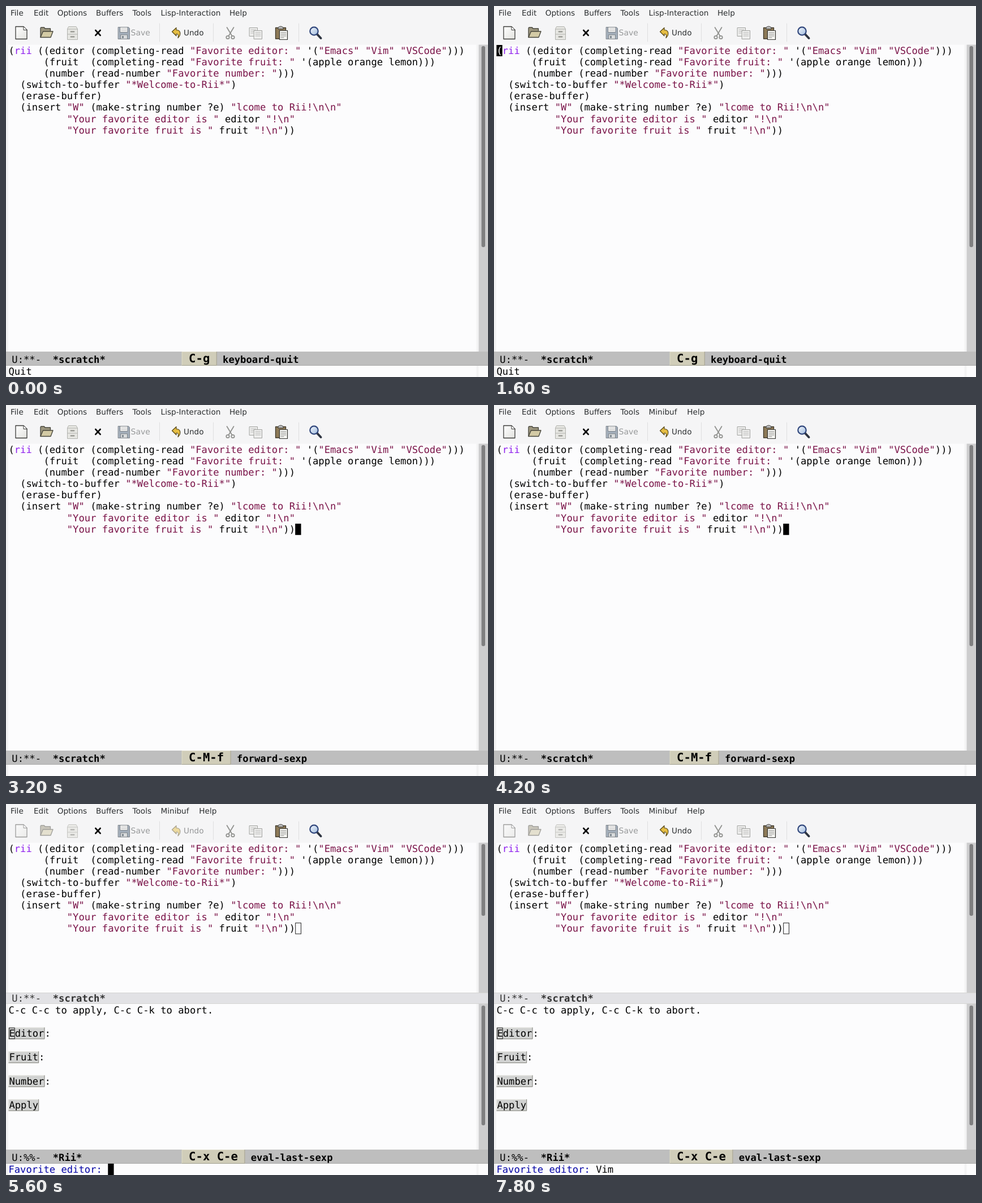
Recreate the animation shown at these times as an HTML page. Size 852x657 px, loop 8 s.

```html
<!DOCTYPE html>
<html lang="en">
<head>
<meta charset="utf-8">
<title>Form built from a Lisp expression</title>
<style>
  html, body { margin: 0; width: 100%; height: 100%; overflow: hidden; background: #fcfcfd; }
  svg { display: block; }
  text { white-space: pre; text-rendering: geometricPrecision; }
  .mono { font: 17.18px "DejaVu Sans Mono", monospace; fill: #000; }
  .bold { font-weight: bold; }
  .key { font-size: 20.6px; font-weight: bold; }
  .dim { fill: #333; }
  .glyph { fill: #fff; }
  .ui { font: 13.6px "DejaVu Sans", sans-serif; fill: #2b2e30; }
  .save { font-size: 14px; fill: #989a9b; }
  .str { fill: #7a1348; }
  .kw { fill: #8f1fee; }
  .prompt { fill: #0505a5; }
</style>
</head>
<body>
<svg id="stage" width="852" height="657" viewBox="0 0 852 657">
  <defs>
    <linearGradient id="page" x1="0" y1="0" x2="1" y2="1">
      <stop offset="0" stop-color="#fff"/><stop offset="1" stop-color="#e2e2de"/>
    </linearGradient>
    <linearGradient id="lens" x1="0" y1="0" x2="1" y2="1">
      <stop offset="0" stop-color="#f4f8fd"/><stop offset="1" stop-color="#9db9dc"/>
    </linearGradient>
  </defs>
  <rect width="852" height="657" fill="#fcfcfd"/>
  <rect width="852" height="68.5" fill="#f5f5f6"/>
  <path d="M0 68.5H4V657H0ZM831.5 68.5H835.5V657H831.5Z" fill="#f3f3f4"/>
  <g id="menu"></g>

  <g stroke-linejoin="round" stroke-linecap="round">
    <path d="M271.5 31V63M366.5 31V63M517.5 31V63" stroke="#dededf"/>
    <g id="fileIcons">
      <path d="M17 36.5H31L37 42.5V58.5H17Z" fill="url(#page)" stroke="#3c3c3a" stroke-width="1.3"/>
      <path d="M31 36.5V42.5H37Z" fill="#fff" stroke="#3c3c3a"/>
      <path d="M61 55.5V39.5Q61 38 62.5 38H67.5L69 40H78.5V44" fill="#9d977f" stroke="#45443a" stroke-width="1.3"/>
      <path d="M61 55.5L65.5 45H83L79 55.5Z" fill="#d3caa5" stroke="#45443a" stroke-width="1.3"/>
    </g>
    <g id="cabinet" stroke="#b1b2ad">
      <path d="M111 36.5H124L126.5 41V59.5H108.5V41Z" fill="#e6e6e2"/>
      <path d="M108.5 41H126.5M108.5 50H126.5"/>
      <path d="M114.5 45.500H120.5M114.5 54.5H120.5" stroke="#8b8c86" stroke-width="1.8"/>
    </g>
    <path d="M158.3 43L166.7 52M166.7 43L158.3 52" stroke="#0b0b0b" stroke-width="2.6"/>
    <g stroke="#7f858b">
      <path d="M198.5 37.5H216.5L218.5 39.5V58.5H198.5Z" fill="#a2adb9"/>
      <path d="M202 37.5H215V46.5H202Z" fill="#f0f0ef"/>
      <path d="M204 40.5H213M204 43.5H213" stroke="#c5c5c5"/>
      <path d="M203 51H214.5V58.5H203Z" fill="#d9dbdc"/>
      <path d="M205 53H208V57H205Z" fill="#7e8890" stroke="none"/>
    </g>
    <g id="undo">
      <path d="M293.5 45.5L301 38.5V42.5C308.5 42.5 310.5 50 304 56.5C305.5 51.5 304.5 49.5 301 49.5V53Z" fill="#e5bd43" stroke="#554719" stroke-width="1.2"/>
      <text class="ui" x="314" y="52">Undo</text>
    </g>
    <g fill="none" stroke="#91928f" stroke-width="1.8">
      <path d="M390.5 38L399.5 53M402.5 38L393.5 53"/>
      <circle cx="392" cy="55.5" r="2.7"/><circle cx="401" cy="55.5" r="2.7"/>
    </g>
    <g fill="#eeeeed" stroke="#a0a19e">
      <path d="M430.5 38.5H444.5V53.5H430.5Z"/>
      <path d="M433 42H442M433 45H442M433 48H437" stroke="#bcbcba"/>
      <path d="M438.5 43.5H452.5V58.5H438.5Z"/>
      <path d="M441 47H450M441 50H450M441 53H450" stroke="#b8b8b6"/>
    </g>
    <g>
      <path d="M476.5 38.5H494.5V58H476.5Z" fill="#8d7a58" stroke="#3f3829" stroke-width="1.3"/>
      <path d="M481 40.5V38Q485.5 34 490 38V40.5Z" fill="#bbb" stroke="#3c3c3a"/>
      <path d="M483.5 43.5H497.5V59.5H483.5Z" fill="#f5f5f1" stroke="#343431" stroke-width="1.2"/>
      <path d="M486 47H495M486 50H495M486 53H495M486 56H491" stroke="#888"/>
    </g>
    <path d="M550 50L556.5 57" stroke="#2e3440" stroke-width="4"/>
    <circle cx="544.5" cy="44.5" r="7.2" fill="url(#lens)" stroke="#31477c" stroke-width="2.2"/>
    <text class="ui save" x="220.5" y="52">Save</text>
  </g>

  <g id="code"></g>
  <rect id="scrollbar" x="835.5" y="68.5" width="16.5" height="544" fill="#cdcdce"/>
  <rect id="thumb" x="840.5" y="71" width="6.5" height="356" rx="3" fill="#7f7f80"/>

  <g id="form">
    <rect x="835.5" y="354" width="16.5" height="259" fill="#cdcdce"/>
    <rect x="840.5" y="357" width="6.5" height="212" rx="3" fill="#7f7f80"/>
    <rect y="334" width="852" height="20" fill="#e2e2e5"/>
    <path d="M0 334.5H852M0 353.5H852" stroke="#d5d5d3"/>
  </g>

  <rect y="612" width="852" height="25" fill="#bebebe"/>
  <path d="M0 636.5H852" stroke="#aaa"/>
  <g id="modeline"></g>
  <g id="echo"></g>
  <g id="cursor"></g>
</svg>

<script>
const DURATION = 8000, CELL = 10.343, LEFT = 4.4, TOP = 69, LINE = 20.17;
const KEY_CELL = CELL * 1.2, KEY_X = 310.7;
const $ = id => document.getElementById(id);

const code = String.raw`(rii ((editor (completing-read "Favorite editor: " '("Emacs" "Vim" "VSCode")))
      (fruit  (completing-read "Favorite fruit: " '(apple orange lemon)))
      (number (read-number "Favorite number: ")))
  (switch-to-buffer "*Welcome-to-Rii*")
  (erase-buffer)
  (insert "W" (make-string number ?e) "lcome to Rii!\n\n"
          "Your favorite editor is " editor "!\n"
          "Your favorite fruit is " fruit "!\n"))`.split("\n");

const label = (x, y, content, cls = "mono") => `<text class="${cls}" x="${x}" y="${y}">${content}</text>`;
const rect = (x, y, w, h, attrs) => `<rect x="${x}" y="${y}" width="${w}" height="${h}" ${attrs}/>`;
const hollow = (x, y) => rect(x + .5, y + .5, CELL - .6, 19.3, 'fill="none" stroke="#222"');

const raised = (x, y, w, h, fill, light, dark) =>
  rect(x, y, w, h, `fill="${fill}"`) +
  `<path d="M${x + .5} ${y + h}V${y + .5}H${x + w}" fill="none" stroke="${light}"/>` +
  `<path d="M${x} ${y + h - .5}H${x + w - .5}V${y}" fill="none" stroke="${dark}"/>`;

const highlight = line => line
  .replace(/"[^"]*"/g, s => `<tspan class='str'>${s}</tspan>`)
  .replace(/^\(rii/, "(<tspan class='kw'>rii</tspan>");

$("code").innerHTML = code
  .map((line, i) => label(LEFT, TOP + 15.6 + i * LINE, highlight(line))).join("");

const endX = LEFT + 49 * CELL, endY = TOP + 7 * LINE;
const buttons = ["Editor", "Fruit", "Number", "Apply"].map((name, i) => {
  const y = 395.7 + i * 42.4, w = name.length * CELL + 2;
  return raised(LEFT, y, w, 20.7, "#d1d2d1", "#e6e6e0", "#85857d") +
    label(LEFT + 1, y + 16.1, name) +
    (name === "Apply" ? "" : label(LEFT + w, y + 16.1, ":"));
}).join("");
$("form").innerHTML += hollow(endX, endY) +
  label(CELL, 350, "U:**-", "mono dim") +
  label(CELL * 8, 350, "*scratch*", "mono bold dim") +
  label(LEFT, 370.5, "C-c C-c to apply, C-c C-k to abort.") +
  buttons + hollow(LEFT + .6, 396);

const menus = [[8, "File"], [49, "Edit"], [90.7, "Options"], [159, "Buffers"], [223.5, "Tools"]];
const lispMenu = [[273.6, "Lisp-Interaction"], [394.9, "Help"]];
const miniMenu = [[273.6, "Minibuf"], [341.3, "Help"]];

const commands = [
  [0, "C-g", "keyboard-quit"],
  [2800, "C-M-f", "forward-sexp"],
  [4400, "C-x C-e", "eval-last-sexp"],
];
const typed = [[0, ""], [6600, "V"], [6800, "Vi"], [7000, "Vim"]];
// The cursor blinks with a one second period, restarted by each key.
const blinkStarts = [-700, 2800, 4400, 6600, 6800, 7000];
const at = (steps, t) => steps.findLast(([start]) => start <= t);

function setHTML(id, html) {
  const node = $(id);
  if (node.lastHTML !== html) node.innerHTML = node.lastHTML = html;
}

const cursorAt = (x, y, h, glyph = "") =>
  rect(x, y, CELL, h, 'fill="#000"') + label(x, y + 15.6, glyph, "mono glyph");

function render(t) {
  const split = t >= 4400;
  const [, keys, command] = at(commands, t);
  const [, input] = at(typed, t);
  const keyWidth = (keys.length + 2) * KEY_CELL;

  setHTML("menu", menus.concat(t >= 4200 ? miniMenu : lispMenu)
    .map(([x, name]) => label(x, 17.3, name, "ui")).join(""));
  $("fileIcons").style.opacity = split ? .48 : 1;
  $("cabinet").style.opacity = split ? .7 : 1;
  $("undo").style.opacity = split && !input ? .48 : 1;

  $("form").style.display = split ? "" : "none";
  $("scrollbar").setAttribute("height", split ? 265.5 : 544);
  $("thumb").setAttribute("height", split ? 127 : 356);

  setHTML("modeline",
    label(CELL, 631.6, split ? "U:%%-" : "U:**-") +
    label(CELL * 8, 631.6, split ? "*Rii*" : "*scratch*", "mono bold") +
    raised(KEY_X, 612, keyWidth, 25, "#d0cdb9", "#dedbc9", "#a19f8f") +
    label(KEY_X + KEY_CELL, 631.2, keys, "mono key") +
    label(KEY_X + keyWidth + CELL, 631.6, command, "mono bold"));

  setHTML("echo", label(LEFT, 652.6, split
    ? `<tspan class="prompt">Favorite editor: </tspan>${input}`
    : t < 2800 ? "Quit" : ""));

  const lit = (t - blinkStarts.findLast(start => start <= t)) % 1000 < 500;
  setHTML("cursor", !lit ? ""
    : split ? cursorAt(LEFT + (17 + input.length) * CELL, 636.9, 20.1)
    : t >= 2800 ? cursorAt(endX, endY, 20)
    : cursorAt(LEFT, TOP, 20, "("));
}

const start = performance.now();
function tick() {
  render((performance.now() - start) % DURATION);
  requestAnimationFrame(tick);
}
tick();
</script>
</body>
</html>
```
